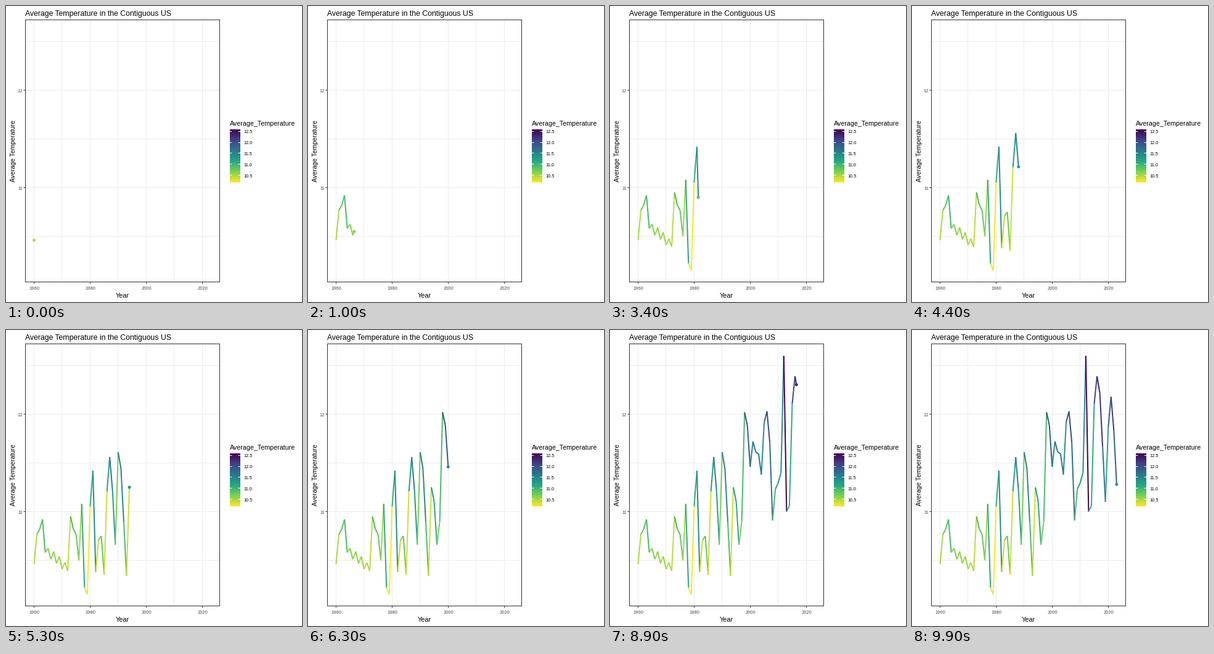
A matplotlib script for the animation above (10 s loop, 480x480 px).

```python
import matplotlib.pyplot as plt
import numpy as np
from matplotlib.animation import FuncAnimation
from matplotlib.collections import LineCollection
from matplotlib.colors import LinearSegmentedColormap
from matplotlib.patches import Circle, Rectangle

SIZE, FRAMES, INTERVAL = 480, 100, 100
START, SPAN = 1960, 63
PT = 0.72  # points per pixel at 100 dpi
LEFT, TOP, RIGHT, BOTTOM = 31.5, 22.5, 346.5, 447.5
FONT = "Liberation Sans"

# Turning points: years since START -> degrees
TURNS = {0: 10.46, 3: 10.92, 4: 10.58, 12: 10.39, 13: 10.95, 16: 10.5,
         17: 11.08, 18: 10.22, 19: 10.15, 21: 11.42, 22: 10.38, 24: 10.75,
         25: 10.35, 27: 11.56, 29: 10.66, 30: 11.61, 33: 10.34, 34: 11.25,
         36: 10.66, 37: 10.9, 38: 12.02, 40: 11.46, 41: 11.72, 44: 11.38,
         46: 12.03, 48: 10.91, 51: 11.4, 52: 12.6, 53: 11.0, 54: 11.06,
         56: 12.39, 59: 11.1, 61: 12.18, 63: 11.28}


def x_of(year):
    return 45.5 + 4.545 * year


def y_of(temp):
    return 294.5 - 157.9 * (temp - 11)


def yearly_temps():
    """Rise fast and fall late between turns, with a small zigzag."""
    temps = np.zeros(SPAN + 1)
    knots = list(TURNS.items())
    for (a, ta), (b, tb) in zip(knots, knots[1:]):
        for year in range(a, b):
            t = (year - a) / (b - a)
            ease = 1 - (1 - t) ** 2 if tb > ta else t ** 1.6
            zigzag = 0.05 * (-1) ** (year + 1) if year > a else 0
            temps[year] = ta + (tb - ta) * ease + zigzag
    temps[-1] = knots[-1][1]
    return temps


years = np.arange(SPAN + 1)
temps = yearly_temps()
points = np.column_stack([x_of(years), y_of(temps)])
cmap = LinearSegmentedColormap.from_list(
    "heat", plt.cm.viridis(np.linspace(1, 0, 6)))
colors = cmap((temps - temps.min()) / np.ptp(temps))
keys = np.round(years * (FRAMES - 1) / SPAN)

fig = plt.figure(figsize=(4.8, 4.8), dpi=100, facecolor="white")
ax = fig.add_axes([0, 0, 1, 1])
ax.axis("off")


def pixel(v):
    return int(v) + 0.5


def line(x, y, color, z=1):
    ax.plot(x, y, color=color, lw=PT, zorder=z, solid_capstyle="butt",
            snap=False)


def label(x, y, text, px, color="black", ha="left", va="baseline", **kw):
    ax.text(x, y, text, fontsize=px * PT, color=color, ha=ha, va=va,
            family=FONT, **kw)


def draw_panel():
    for year in range(0, 61, 10):
        x = pixel(x_of(year))
        line([x, x], [TOP, BOTTOM], "#ebebeb")
        if year % 20 == 0:
            line([x, x], [BOTTOM, BOTTOM + 3], "#333333", 2)
            label(x, 460, str(START + year), 7.6, "#4d4d4d", "center")
    for temp in np.arange(10.5, 13, 0.5):
        y = pixel(y_of(temp))
        line([LEFT, RIGHT], [y, y], "#ebebeb")
        if temp in (11, 12):
            line([LEFT - 3, LEFT], [y, y], "#333333", 2)
            label(27.3, y + 3, f"{temp:.0f}", 7.6, "#4d4d4d", "right")
    ax.add_patch(Rectangle((LEFT, TOP), RIGHT - LEFT, BOTTOM - TOP,
                           fill=False, ec="#333333", lw=PT, zorder=5,
                           snap=False))
    label(31, 16, "Average Temperature in the Contiguous US", 12.3)
    label(188.5, 473.3, "Year", 10.9, ha="center")
    label(16.8, 235.3, "Average Temperature", 10.4, ha="right", va="center",
          rotation=90)


def draw_legend():
    ramp = np.linspace(1, 0, 256)[:, None]
    ax.imshow(ramp, cmap=cmap, extent=(363, 380, 286, 200),
              aspect="auto", interpolation="bilinear", zorder=1)
    label(362.6, 194.2, "Average_Temperature", 10.6)
    for i in range(5):
        y = pixel(203.7 + 17.6 * i)
        line([363, 366.4], [y, y], "white", 2)
        line([376.6, 380], [y, y], "white", 2)
        label(385.5, y + 3, f"{12.5 - 0.5 * i:.1f}", 7.4)


draw_panel()
draw_legend()
ax.set_xlim(0, SIZE)
ax.set_ylim(SIZE, 0)

path = LineCollection([], linewidths=2 * PT, capstyle="butt", zorder=3)
ax.add_collection(path, autolim=False)
dot = ax.add_patch(Circle(points[0], 2.5, lw=0, zorder=4))


def update(frame):
    last = np.searchsorted(keys, frame, side="right") - 1
    head, tint = points[last], colors[last]
    trail = points[:last + 1]
    if frame > keys[last]:
        f = (frame - keys[last]) / (keys[last + 1] - keys[last])
        head = head + f * (points[last + 1] - head)
        tint = tint + f * (colors[last + 1] - tint)
        trail = np.vstack([trail, head])
    # Each segment takes the colour of its starting year
    path.set_segments(list(np.stack([trail[:-1], trail[1:]], axis=1)))
    path.set_color(colors[:max(len(trail) - 1, 1)])
    dot.center = head
    dot.set_facecolor(tint)
    return path, dot


anim = FuncAnimation(fig, update, frames=FRAMES, interval=INTERVAL,
                     repeat=True, repeat_delay=0, blit=False)
plt.show()
```
